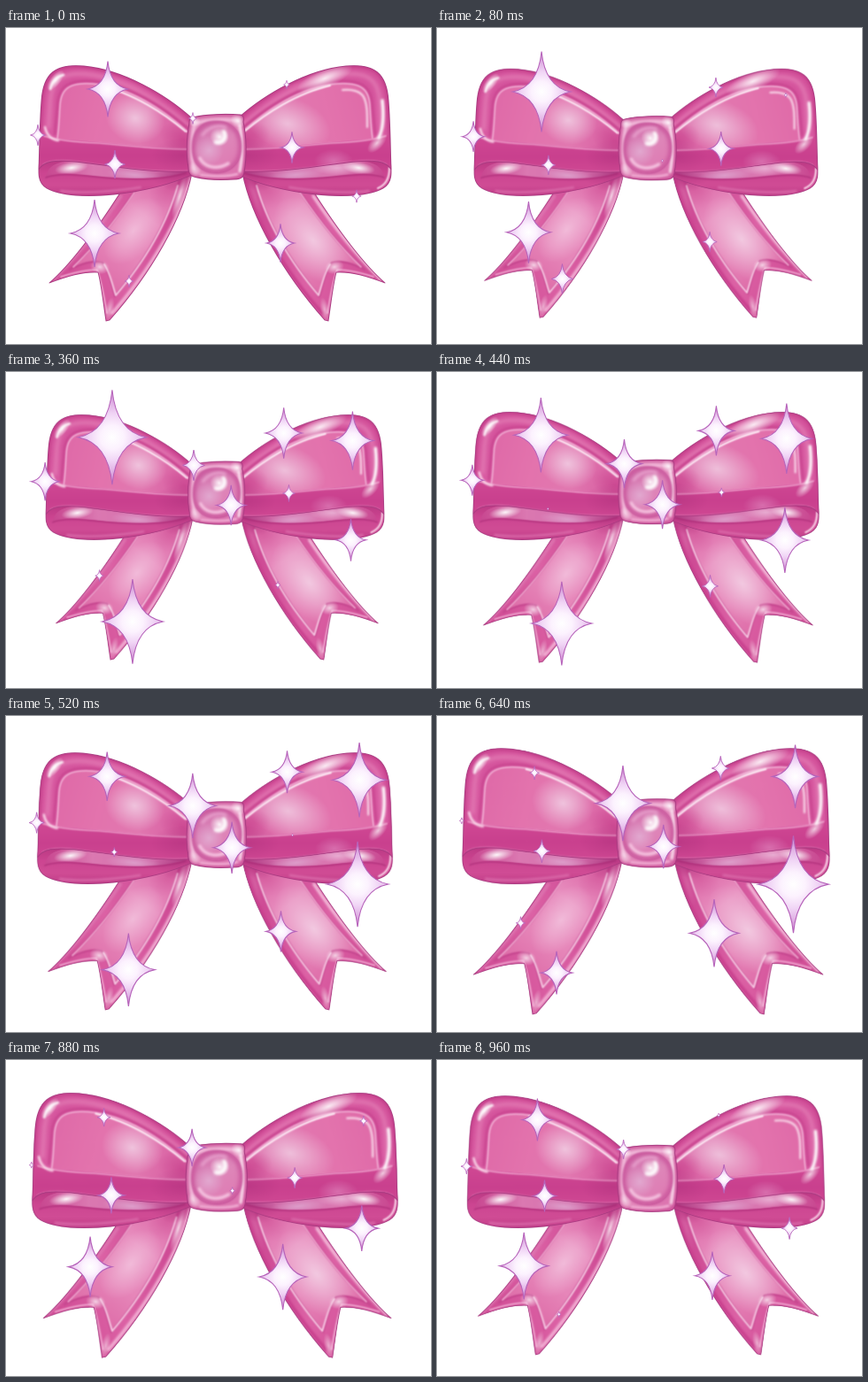
These frames come from a looping animation (480x357 px, 1 s). An HTML page with a canvas:

```html
<!DOCTYPE html>
<html lang="en">
<head>
<meta charset="utf-8">
<title>Sparkling bow</title>
<style>
html, body { margin: 0; width: 100%; height: 100%; overflow: hidden; background: #fff; }
canvas { display: block; }
</style>
</head>
<body>
<canvas id="stage" width="480" height="357"></canvas>
<script>
const W = 480, H = 357, LOOP = 1000, STEP = 40, CX = 236, CY = 186, RES = 2;
const ctx = document.getElementById('stage').getContext('2d');
ctx.imageSmoothingQuality = 'high';

const sheet = document.createElement('canvas');
sheet.width = W * RES;
sheet.height = H * RES;
const g = sheet.getContext('2d');
g.scale(RES, RES);
g.lineCap = g.lineJoin = 'round';

const EDGE = '#a83a80';

function linear(x0, y0, x1, y1, ...colors) {
  const grad = g.createLinearGradient(x0, y0, x1, y1);
  colors.forEach((c, i) => grad.addColorStop(i / (colors.length - 1), c));
  return grad;
}

function fill(d, style) {
  g.fillStyle = style;
  g.fill(new Path2D(d));
}

function line(d, color, width, blur = 0) {
  g.filter = blur ? `blur(${blur * RES}px)` : 'none';
  g.strokeStyle = color;
  g.lineWidth = width;
  g.stroke(new Path2D(d));
  g.filter = 'none';
}

// Soft elliptical spot; rgb is a "r,g,b" string.
function glow(x, y, rx, ry, angle, alpha, rgb = '255,255,255') {
  g.save();
  g.translate(x, y);
  g.rotate(angle);
  g.scale(rx, ry);
  const grad = g.createRadialGradient(0, 0, 0, 0, 0, 1);
  grad.addColorStop(0, `rgba(${rgb},${alpha})`);
  grad.addColorStop(0.5, `rgba(${rgb},${alpha * 0.5})`);
  grad.addColorStop(1, `rgba(${rgb},0)`);
  g.fillStyle = grad;
  g.fillRect(-1, -1, 2, 2);
  g.restore();
}

function inside(d, draw) {
  g.save();
  g.clip(new Path2D(d));
  draw();
  g.restore();
}

function mirrored(sum, draw) {
  g.save();
  g.translate(sum, 0);
  g.scale(-1, 1);
  draw();
  g.restore();
}

function tail(right) {
  const shape = 'M210 164C200 214 164 277 117 330L113 331C110 312 108 291 104 276C86 275 68 281 49 288C72 268 101 230 129 186Z';
  const panel = 'M197 166C186 214 160 259 123 303C119 289 116 274 109 265C98 262 86 266 72 273C97 250 122 220 147 182Z';
  fill(shape, linear(60, 280, 190, 230, '#d04c95', '#dc62a5', '#cf4c96'));
  inside(shape, () => {
    line('M208 170C197 215 164 272 120 322', right ? '#c83f8d' : '#f3b3d6', 3.5, 1.2);
    line('M130 190C102 232 78 260 54 284', right ? '#f6c4df' : '#dd75b0', 3, 1.2);
    line('M62 281C78 276 92 273 103 273C108 288 111 304 114 322', '#efa5cf', 1.8, 0.8);
    fill(panel, linear(185, 175, 100, 285, '#dc67a7', '#e88fbf', '#e686b9', '#de6ca8'));
    inside(panel, () => {
      if (right) glow(130, 240, 58, 34, -0.9, 0.75, '246,222,237');
      else glow(144, 229, 44, 26, -0.9, 0.6, '248,218,236');
      glow(184, 180, 26, 20, -0.9, 0.35, '200,68,140');
    });
    line(panel, '#c74890', 2.2, 0.9);
    line('M194 178C182 220 158 262 124 302C120 289 117 276 111 267', '#f6c6e1', 2, 0.8);
    line('M76 270C101 246 124 217 145 186', '#f0a9d0', 1.6, 0.7);
    glow(106, 270, 11, 8, 0.2, 0.7);
    glow(117, 318, 5, 14, 0.2, 0.5);
    glow(196, 190, 5, 26, 0.3, right ? 0.1 : 0.75);
    glow(200, 170, 24, 12, -0.4, 0.4, '160,35,110');
  });
  line(shape, EDGE, 0.9);
}

function loop(right) {
  const ring = 'M38 148C36 165 36 175 46 181C62 190 92 191 122 188C160 184 190 175 212 165L205 146Z';
  const hollow = 'M45 168C48 152 64 149 88 151C125 154 160 163 203 163C180 170 152 171 122 169C90 167 64 161 45 168Z';
  const front = 'M209 101C180 75 132 47 88 43C56 40 42 51 40 82C38 106 38 130 37 160C43 150 56 149 78 151C116 155 158 164 206 162Z';
  const panel = 'M206 118C176 91 140 67 98 63C70 61 62 70 61 88C60 103 59 115 58 125C102 128 160 135 206 136Z';
  const band = 'M40 121C58 127 80 129 104 130C140 133 174 138 207 138L207 164C158 165 116 156 78 152C56 150 43 151 37 160Z';

  fill(ring, linear(0, 150, 0, 191, '#bb3a84', '#cc4591', '#d04c95', '#be3a86'));
  inside(ring, () => {
    fill(hollow, linear(45, 0, 205, 0, '#c84790', '#db78b1', '#d572ae', '#c04c92'));
    inside(hollow, () => {
      glow(74, 158, 19, 7, -0.15, 0.95);
      glow(145, 166, 32, 8, 0.1, 0.5, '228,198,228');
      if (right) glow(98, 158, 28, 8, 0, 0.6, '240,205,230');
    });
    line('M45 169C64 162 90 168 122 170C152 172 180 171 203 164', '#b53680', 1.6, 0.7);
    line('M62 184C92 188 126 184 152 180', '#df73b0', 2, 1.2);
    if (right) line('M39 158C39 170 43 177 52 181', '#f7cde4', 2.2, 0.9);
    glow(200, 164, 36, 12, -0.2, 0.4, '150,34,108');
  });
  line(ring, EDGE, 0.9);

  fill(front, linear(60, 45, 130, 150, '#d4539c', '#da5ca3', '#d24d98'));
  inside(front, () => {
    line(front, '#c03b86', 4, 1.5);
    line('M206 110C176 84 132 56 90 52C64 50 52 58 50 82L48 112', '#e27ab3', 4, 2);
    line('M206 114C176 88 138 64 98 60C70 58 59 66 58 88L55 120', '#c94690', 2.5, 1.1);
    fill(panel, linear(60, 80, 205, 120, '#df6aa8', '#e373ad', '#e178b0', '#d75a9f'));
    inside(panel, () => {
      if (right) glow(154, 108, 50, 30, -0.3, 0.7, '244,220,236');
      else glow(146, 102, 34, 28, 0.3, 0.75, '244,220,236');
      glow(200, 126, 28, 18, 0.4, 0.45, '190,52,130');
    });
    line('M58 125C60 112 60 103 61 88C62 70 70 61 98 63C140 67 176 91 206 118', '#efa8d0', 1.8, 0.8);
    line('M106 65C144 74 178 96 203 117', '#fdeaf5', 2, 0.7);
    fill(band, linear(0, 124, 0, 164, '#cf4793', '#c9408e', '#cf4893'));
    line('M43 122C58 127 80 129 104 130C140 133 174 137 207 137', '#ea95c4', 1.8, 0.8);
    line('M42 154C52 148 68 149 82 151C116 156 158 163 206 161', '#d768a8', 1.3, 0.7);
    glow(200, 144, 36, 20, 0, 0.25, '150,34,108');
    if (right) {
      line('M64 112C64 96 64 86 68 78C72 71 82 69 92 70', '#fbe3f0', 2, 1);
      line('M47 82C45 100 46 114 51 124', '#fff', 3.4, 1.4);
      glow(53, 130, 14, 7, 0.8, 0.7);
      glow(112, 57, 34, 11, 0.4, 0.85);
      glow(102, 150, 22, 13, 0, 0.35, '240,190,228');
    } else {
      glow(56, 59, 14, 6, -0.9, 0.9);
      line('M50 69C52 60 57 55 65 53', '#fff', 2.4, 1.1);
      line('M44 112C46 121 51 126 59 127', '#fbdcec', 2.4, 1);
    }
  });
  line(front, EDGE, 0.9);
}

function knot() {
  const shape = 'M211 101C226 97 250 97 265 98C268 99 269 101 268 106C272 124 272 146 269 163C268 169 265 171 258 171C243 172 229 172 216 169C208 168 206 164 206 158C203 141 204 124 207 107C207 103 208 102 211 101Z';
  fill(shape, linear(208, 104, 268, 168, '#e495c2', '#e58dbe', '#da6cab'));
  inside(shape, () => {
    line(shape, '#c84c94', 4, 1.6);
    line('M212 158C209 142 210 124 213 108C230 103 250 103 262 105', '#f3bedd', 3, 1.3);
    line('M264 110C267 128 267 146 264 162', '#fbe3f0', 3, 1.3);
    line('M220 166C236 168 250 168 261 165', '#f1afd4', 2.5, 1.1);
    glow(262, 105, 9, 7, 0.6, 0.8);
    glow(213, 106, 7, 6, 0, 0.7);
    glow(213, 160, 7, 9, -0.5, 0.5);
  });
  line(shape, EDGE, 1);

  const pearl = 'M237 106C256 106 265 118 265 134C265 152 254 163 237 163C219 163 211 151 211 135C211 117 220 106 237 106Z';
  line(pearl, '#c24d95', 2.4, 1.1);
  fill(pearl, linear(218, 112, 252, 160, '#d273ae', '#de86b9', '#df7bb3'));
  inside(pearl, () => {
    line(pearl, '#c9559b', 5, 2.4);
    glow(229, 138, 17, 17, 0, 0.6, '228,190,222');
    line('M219 147C224 157 238 161 251 153', '#f5c3e0', 3.4, 1.4);
    line('M222 121C228 112 240 109 248 112', '#e9a4cf', 3, 1.6);
    line('M237 129C244 131 250 124 246 117', '#fff', 4.5, 1.5);
    glow(241, 123, 11, 10, 0.5, 0.9);
  });
}

tail(false);
mirrored(477, () => tail(true));
loop(false);
mirrored(472, () => loop(true));
knot();

// x, y, peak half-height, peak moment in the loop
const stars = [
  [115, 69, 63, 0.25], [317, 64, 30, 0.37], [323, 135, 20, 0.11],
  [36, 121, 25, 0.26], [123, 154, 20, 0.85], [100, 232, 38, 0],
  [139, 286, 50, 0.38], [310, 243, 42, 0.755], [211, 102, 41, 0.63],
  [255, 149, 29, 0.5], [398, 73, 42, 0.5], [396, 190, 53, 0.62]
];

function star(x, y, h) {
  const w = h * 0.72, c = 0.12;
  ctx.save();
  ctx.translate(x, y);
  ctx.beginPath();
  ctx.moveTo(0, -h);
  ctx.quadraticCurveTo(w * c, -h * c, w, 0);
  ctx.quadraticCurveTo(w * c, h * c, 0, h);
  ctx.quadraticCurveTo(-w * c, h * c, -w, 0);
  ctx.quadraticCurveTo(-w * c, -h * c, 0, -h);
  const grad = ctx.createRadialGradient(0, 0, 0, 0, 0, h);
  grad.addColorStop(0, '#fff');
  grad.addColorStop(0.25, '#fcf2fe');
  grad.addColorStop(0.5, '#f0d4f5');
  grad.addColorStop(1, '#cb83cf');
  ctx.fillStyle = grad;
  ctx.fill();
  ctx.strokeStyle = '#b663ba';
  ctx.lineWidth = Math.min(1.1, 0.5 + h * 0.03);
  ctx.stroke();
  ctx.restore();
}

function render(t) {
  const scale = 1 - 0.0528 * Math.sin(2 * Math.PI * t);
  ctx.setTransform(1, 0, 0, 1, 0, 0);
  ctx.fillStyle = '#fff';
  ctx.fillRect(0, 0, W, H);
  ctx.translate(CX, CY);
  ctx.scale(scale, scale);
  ctx.translate(-CX, -CY);
  ctx.drawImage(sheet, 0, 0, W, H);
  for (const [x, y, peak, at] of stars) {
    const h = peak / 2 * (1 + Math.cos(2 * Math.PI * (t - at)));
    if (h > 1.5) star(x, y, h);
  }
}

const start = performance.now();
let shown = -1;
function tick() {
  const ms = (performance.now() - start) % LOOP;
  const step = Math.floor(ms / STEP);
  if (step !== shown) render((shown = step) * STEP / LOOP);
  requestAnimationFrame(tick);
}
tick();
</script>
</body>
</html>
```
